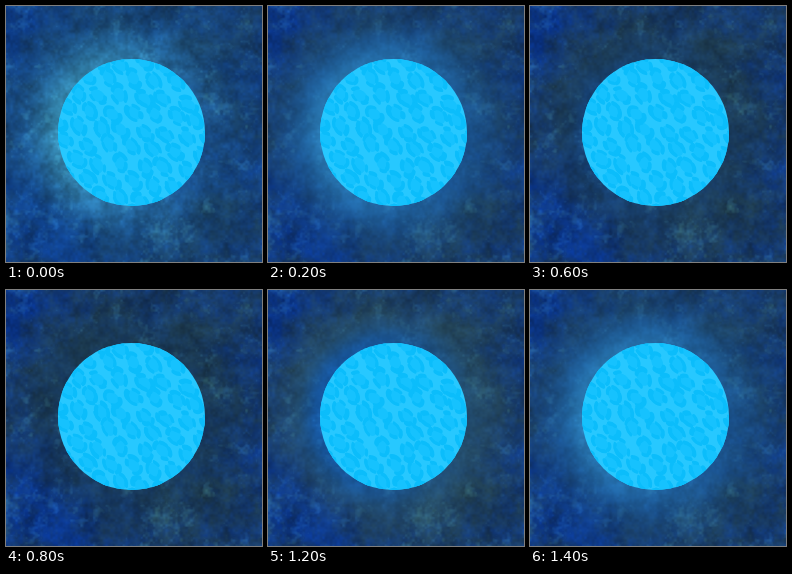
Recreate the animation shown at these times as an HTML page with a canvas. Size 256 by 256 pixels, loop 1.6 s.

```html
<!DOCTYPE html>
<html lang="en">
<head>
<meta charset="utf-8">
<style>
html, body { margin: 0; height: 100%; overflow: hidden; background: #12385e; }
canvas { display: block; width: 100vw; height: 100vh; }
</style>
</head>
<body>
<canvas id="stage" width="256" height="256"></canvas>
<script>
const N = 256, CX = 125.5, CY = 126.5, R = 73.5, STEP = 200;
const ctx = document.getElementById('stage').getContext('2d');

const mix = (a, b, t) => a + (b - a) * t;
const clamp = v => Math.max(0, Math.min(1, v));
const smooth = t => t * t * (3 - 2 * t);

function hash(x, y, seed) {
  let h = Math.imul(x, 374761393) ^ Math.imul(y, 668265263) ^ Math.imul(seed, 974634721);
  h = Math.imul(h ^ (h >>> 13), 1274126177);
  return ((h ^ (h >>> 16)) >>> 0) / 4294967296;
}

function noise(x, y, seed) {
  const i = Math.floor(x), j = Math.floor(y), u = smooth(x - i), v = smooth(y - j);
  return mix(mix(hash(i, j, seed), hash(i + 1, j, seed), u),
             mix(hash(i, j + 1, seed), hash(i + 1, j + 1, seed), u), v);
}

// Layered noise centred on zero
function clouds(x, y, seed) {
  let sum = 0, total = 0, amp = 1;
  for (let size = 20; size > 2; size /= 2, amp *= 0.85) {
    sum += amp * noise(x / size, y / size, seed + Math.floor(size));
    total += amp;
  }
  return sum / total - 0.5;
}

// Blue (positive) and slate (negative) regions: x, y, radius, strength
const regions = [
  [8, 22, 48, .5], [22, 205, 48, .45], [254, 70, 34, .45], [60, 238, 40, .3],
  [245, 165, 34, .2], [75, 50, 42, -.3], [198, 60, 48, -.3],
  [205, 218, 46, -.25], [32, 112, 34, -.15], [125, 215, 40, -.1]
];

// Each glow: r, g, b, opacity, spread, lean to the left. grain: texture left inside it.
const looks = {
  mist:  { glows: [[22, 80, 136, .55, 95, .2], [28, 92, 168, .5, 24, .4], [52, 132, 168, .5, 26, .9]], grain: .9 },
  halo:  { glows: [[29, 78, 122, .72, 52, .15], [24, 92, 168, .62, 27, .35], [44, 124, 176, .4, 18, .9]], grain: .3 },
  moss:  { glows: [[45, 83, 98, .75, 43, .1], [18, 78, 146, .5, 15, .7], [22, 88, 164, .4, 20, .9]], grain: .4 },
  dusk:  { glows: [[32, 64, 84, .72, 40, .1], [18, 72, 144, .45, 16, .9]], grain: .65 },
  night: { glows: [[25, 56, 78, .55, 38, .1]], grain: .85 }
};
// Two looks and the share of the second, one entry per step
const steps = [
  ['mist', 'mist', 0], ['halo', 'halo', 0], ['dusk', 'dusk', 0], ['dusk', 'night', .5],
  ['night', 'night', 0], ['dusk', 'dusk', 0], ['moss', 'moss', 0], ['halo', 'halo', 0]
];

const field = [];
for (let y = 0; y < N; y++) for (let x = 0; x < N; x++) {
  let m = 0.42 + 1.1 * clouds(x, y, 7);
  for (const [a, b, r, s] of regions) m += s * Math.exp(-((x - a) ** 2 + (y - b) ** 2) / (r * r));
  const dx = x - CX, dy = y - CY, d = Math.hypot(dx, dy);
  field.push({
    m: clamp(m),
    n: clouds(x, y, 31),
    speck: Math.max(0, clouds(x, y, 83) - 0.08),
    d: Math.max(0, d - R),
    lean: -(dx + 0.25 * dy) / (d + 1)
  });
}

function shade(p, look) {
  let c = [mix(31, 9, p.m), mix(62, 52, p.m), mix(84, 138, p.m)], cover = 0;
  for (const [r, g, b, a, w, lean] of look.glows) {
    const h = clamp(a * (1 + lean * p.lean) * Math.exp(-((p.d / w) ** 2)));
    c = [mix(c[0], r, h), mix(c[1], g, h), mix(c[2], b, h)];
    cover = Math.max(cover, h);
  }
  const grain = mix(1, look.grain, cover), k = 1 + 0.75 * p.n * grain;
  return c.map((v, i) => v * k + [70, 130, 110][i] * p.speck * grain);
}

// Fur pattern: broken rings on a staggered, slanted grid
function drawDisc(c) {
  c.save();
  c.beginPath();
  c.arc(CX, CY, R, 0, 7);
  c.fillStyle = '#27c8ff';
  c.fill();
  c.clip();
  c.strokeStyle = '#0bbdfb';
  c.fillStyle = '#16c2fe';
  c.lineCap = 'round';
  for (let j = -1; j < 10; j++) for (let i = -1; i < 9; i++) {
    const rnd = k => hash(i + 20, j + 20, k);
    const x = 46 + i * 22 + (j & 1) * 11 + 6 * rnd(1), y = 48 + j * 17 + i * 2 + 6 * rnd(2);
    c.save();
    c.translate(x, y);
    c.rotate(0.6 + rnd(3) * 0.6);
    c.scale(1.25, 0.85);
    c.beginPath();
    c.arc(0, 0, 6.5, 0, 7);
    c.fill();
    for (let k = 0; k < 4; k++) {
      const a = k * 1.57 + rnd(k + 4);
      c.lineWidth = 3 + 2 * rnd(k + 9);
      c.beginPath();
      c.arc(0, 0, 6 + 2 * rnd(k + 14), a, a + 0.5 + 0.6 * rnd(k + 19));
      c.stroke();
    }
    c.restore();
  }
  c.restore();
}

const frames = steps.map(([from, to, t]) => {
  const canvas = document.createElement('canvas');
  canvas.width = canvas.height = N;
  const c = canvas.getContext('2d'), img = c.createImageData(N, N);
  field.forEach((p, i) => {
    const a = shade(p, looks[from]), b = t ? shade(p, looks[to]) : a;
    for (let k = 0; k < 3; k++) img.data[i * 4 + k] = mix(a[k], b[k], t);
    img.data[i * 4 + 3] = 255;
  });
  c.putImageData(img, 0, 0);
  drawDisc(c);
  return canvas;
});

const start = performance.now();
function draw() {
  const t = Math.max(0, performance.now() - start);
  ctx.drawImage(frames[Math.floor(t / STEP) % frames.length], 0, 0);
  requestAnimationFrame(draw);
}
draw();
</script>
</body>
</html>
```
